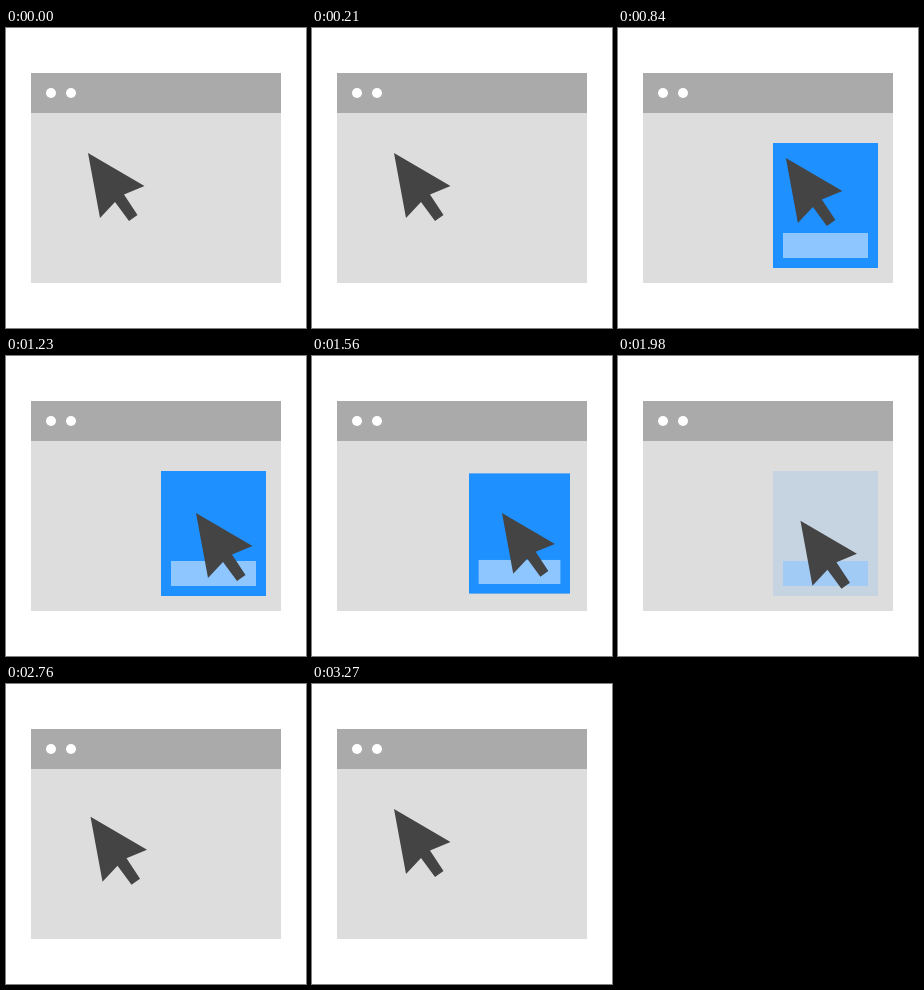
These frames come from a looping animation (300x300 px, 3300 ms). An HTML page:

```html
<!DOCTYPE html>
<html lang="en">
<head>
<meta charset="utf-8">
<title>Cursor click</title>
<style>
html, body { margin: 0; height: 100%; overflow: hidden; background: #fff; }
svg { display: block; width: 100vw; height: 100vh; }
</style>
</head>
<body>
<svg viewBox="0 0 300 300">
  <path fill="#ddd" d="M25 45h250v210h-250z"/>
  <path fill="#aaa" d="M25 45h250v40h-250z"/>
  <circle cx="45" cy="65" r="5" fill="#fff"/>
  <circle cx="65" cy="65" r="5" fill="#fff"/>
  <g id="popup">
    <rect id="card" x="155" y="115" width="105" height="125" fill="#1e90ff"/>
    <rect id="button" x="165" y="205" width="85" height="25" fill="#8ec7ff"/>
  </g>
  <path id="cursor" fill="#444" d="M0 0L56.5 33 36 41.5 49.5 62 41 68 27 49 12 65z"/>
  <path id="there" fill="none" d="M82 125C100 110 155 97 190 157"/>
  <path id="back" fill="none" d="M190 157C170 180 147 184 125 175S86 142 82 125"/>
</svg>
<script>
const LOOP = 3300;
const [popup, card, button, cursor, there, back] =
  ['popup', 'card', 'button', 'cursor', 'there', 'back'].map(id => document.getElementById(id));

const smooth = s => s * s * (3 - 2 * s);
const span = (t, from, to) => Math.min(1, Math.max(0, (t - from) / (to - from)));
const ramp = (t, from, to) => smooth(span(t, from, to));

// cubic-bezier(.33, 0, 0, 1): quick start, long settling tail
function settle(x) {
  let lo = 0, hi = 1;
  for (let i = 0; i < 24; i++) {
    const s = (lo + hi) / 2;
    if (0.99 * s * (1 - s) ** 2 + s ** 3 < x) lo = s; else hi = s;
  }
  return smooth(lo);
}

const along = (path, p) => path.getPointAtLength(p * path.getTotalLength());

function draw(t) {
  card.setAttribute('opacity', ramp(t, 240, 480) - ramp(t, 1800, 2030));
  button.setAttribute('opacity', ramp(t, 330, 570) - ramp(t, 1890, 2120));

  const press = ramp(t, 1350, 1500) - ramp(t, 1500, 1650);
  popup.setAttribute('transform',
    `translate(207.5 177.5) scale(${1 - 0.06 * press}) translate(-207.5 -177.5)`);

  const { x, y } = t < 1800
    ? along(there, ramp(t, 330, 1110))
    : along(back, settle(span(t, 1800, LOOP)));
  cursor.setAttribute('transform', `translate(${x} ${y}) scale(${1 - 0.1 * press})`);
}

const start = performance.now();
function tick() {
  draw((performance.now() - start) % LOOP);
  requestAnimationFrame(tick);
}
tick();
</script>
</body>
</html>
```
